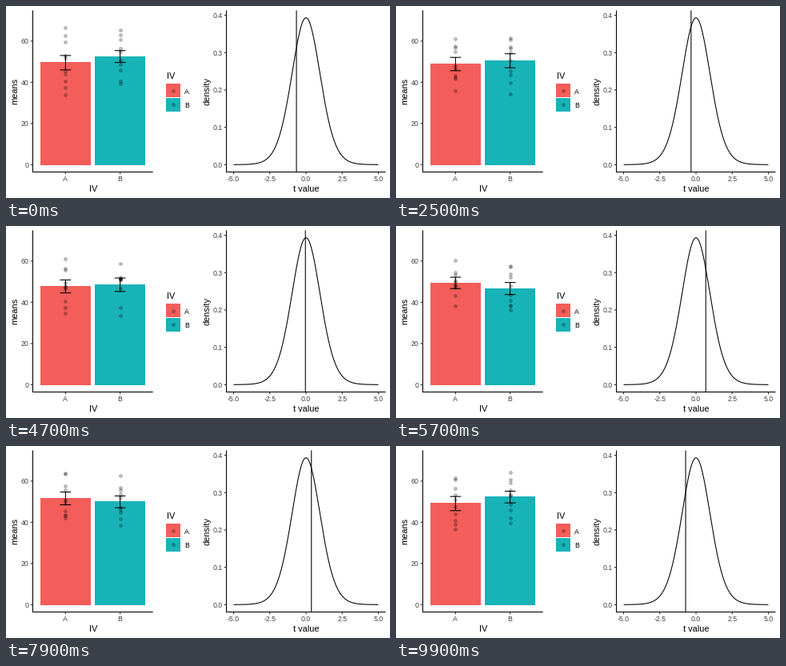
A matplotlib script for the animation above (10000 ms loop, 480 by 240 pixels).

```python
import math

import numpy as np
import matplotlib.pyplot as plt
from matplotlib.animation import FuncAnimation
from matplotlib.patches import Rectangle

W, H, DPI = 480, 240, 72
FRAMES, STEP_MS, N = 100, 100, 10
TOP, BOTTOM, ZERO = 5.5, 207.5, 198.35   # panel edges and the value 0, in pixels
RED, TEAL = "#F35E5A", "#17B3B7"
GREY, TICK = "#404040", "#272727"
DOT = (0, 0, 0, 0.25)
LINE = 1.07
GROUP_X = (74.4, 142.65)
BAR_W, CAP_W = 61.4, 13.7
MEAN_UNIT, DENSITY_UNIT = 2.575, 466.8
T_ZERO, T_UNIT, DF = 375, 18.09, 2 * N - 2

plt.rcParams["font.family"] = "Liberation Sans"

# each experiment: (mean, standard error) of group A and of group B
EXPERIMENTS = np.array([
    [(49.5, 3.5), (52.5, 2.9)],
    [(46.8, 2.95), (50.9, 3.1)],
    [(49.0, 3.2), (50.3, 3.4)],
    [(48.1, 3.4), (51.2, 3.35)],
    [(46.0, 3.65), (52.3, 3.5)],
    [(49.4, 2.65), (44.7, 3.05)],
    [(49.4, 2.85), (48.65, 2.8)],
    [(52.5, 3.4), (49.1, 4.45)],
    [(51.4, 3.05), (50.1, 2.55)],
    [(47.0, 3.1), (51.0, 2.55)],
])
MEANS, ERRORS = EXPERIMENTS[..., 0], EXPERIMENTS[..., 1]
T_VALUES = (MEANS[:, 0] - MEANS[:, 1]) / np.hypot(ERRORS[:, 0], ERRORS[:, 1])


def draw_scores(rng):
    """Random scores with exactly the mean and standard error of each group."""
    z = np.linspace(-1.5, 1.5, N) + rng.normal(0, 0.25, (*MEANS.shape, N))
    z = rng.permuted(z, axis=-1)
    z -= z.mean(axis=-1, keepdims=True)
    z /= z.std(axis=-1, ddof=1, keepdims=True)
    return MEANS[..., None] + z * ERRORS[..., None] * math.sqrt(N)


SCORES = draw_scores(np.random.default_rng(8))


def mean_y(v):
    return ZERO - MEAN_UNIT * v


def density_y(v):
    return ZERO - DENSITY_UNIT * v


def t_x(v):
    return T_ZERO + T_UNIT * v


fig = plt.figure(figsize=(W / DPI, H / DPI), dpi=DPI, facecolor="white")
ax = fig.add_axes([0, 0, 1, 1])
ax.set_xlim(0, W)
ax.set_ylim(H, 0)
ax.axis("off")


def line(xs, ys, color="black"):
    return ax.plot(xs, ys, color=color, lw=LINE, zorder=3, snap=False,
                   solid_capstyle="butt")[0]


def label(x, y, s, size=8.8, color=GREY, **kw):
    ax.text(x, y, s, fontsize=size, color=color, **kw)


def box(x, y, w, h, color):
    return ax.add_patch(Rectangle((x, y), w, h, fc=color, lw=0, zorder=1,
                                  snap=False, antialiased=False))


def dots(xs, ys):
    return ax.scatter(xs, ys, s=15.3, facecolors=[DOT], edgecolors=[DOT],
                      linewidths=0.71, zorder=2, snap=False)


def panel(origin, left, right, x_ticks, y_ticks, x_title, y_title):
    line([left, left], [TOP, BOTTOM])
    line([left - LINE / 2, right], [BOTTOM, BOTTOM])
    for x, s in x_ticks:
        line([x, x], [BOTTOM, BOTTOM + 2.75], TICK)
        label(x, 219.2, s, ha="center")
    for y, s in y_ticks:
        line([left - 2.75, left], [y, y], TICK)
        label(left - 4.8, y + 3.3, s, ha="right")
    label((left + right) / 2 + 0.4, 232, x_title, 11, "black", ha="center")
    label(origin + 14.1, (TOP + BOTTOM) / 2, y_title, 11, "black", ha="center",
          va="baseline", rotation=90, rotation_mode="anchor")


# bar panel
panel(0, 33.5, 183.7, zip(GROUP_X, "AB"),
      [(mean_y(v), str(v)) for v in range(0, 61, 20)], "IV", "means")
bars = [box(x - BAR_W / 2, 0, BAR_W, 1, c) for x, c in zip(GROUP_X, (RED, TEAL))]
errors = [line([], []) for _ in GROUP_X]
dot_x = np.repeat(GROUP_X, N)
points = dots(dot_x, np.zeros(2 * N))

# legend
label(200.7, 91.2, "IV", 11, "black")
for y, s, c in ((105.8, "A", RED), (123.1, "B", TEAL)):
    box(200.9, y - 8.1, 16.2, 16.2, c)
    dots([209], [y])
    label(223.1, y + 3.9, s, color="black")

# density panel
panel(240, 275.5, 474.5,
      [(t_x(v), f"{v:.1f}") for v in np.arange(-5, 6, 2.5) if abs(v) <= 5],
      [(density_y(v), f"{v:.1f}") for v in np.arange(5) / 10],
      "t value", "density")
t = np.linspace(-5, 5, 201)
peak = math.gamma((DF + 1) / 2) / (math.sqrt(DF * math.pi) * math.gamma(DF / 2))
line(t_x(t), density_y(peak * (1 + t * t / DF) ** (-(DF + 1) / 2)))
marker = line([], [])


def update(frame):
    now, step = divmod(frame, 10)
    after = (now + 1) % len(EXPERIMENTS)
    hold = 4 if now else 3
    p = max(0, (step - hold) / (10 - hold))

    def blend(values):
        return values[now] * (1 - p) + values[after] * p

    for x, mean, err, bar, whisker in zip(GROUP_X, blend(MEANS), blend(ERRORS),
                                          bars, errors):
        y, hi, lo = mean_y(mean), mean_y(mean + err), mean_y(mean - err)
        bar.set_y(y)
        bar.set_height(ZERO - y)
        l, r = x - CAP_W / 2, x + CAP_W / 2
        whisker.set_data([l, r, np.nan, x, x, np.nan, l, r],
                         [hi, hi, np.nan, hi, lo, np.nan, lo, lo])
    points.set_offsets(np.column_stack([dot_x, mean_y(blend(SCORES)).ravel()]))
    marker.set_data([t_x(blend(T_VALUES))] * 2, [TOP, BOTTOM])
    return [*bars, *errors, points, marker]


anim = FuncAnimation(fig, update, frames=FRAMES, interval=STEP_MS,
                     repeat=True, repeat_delay=0, blit=False)
plt.show()
```
